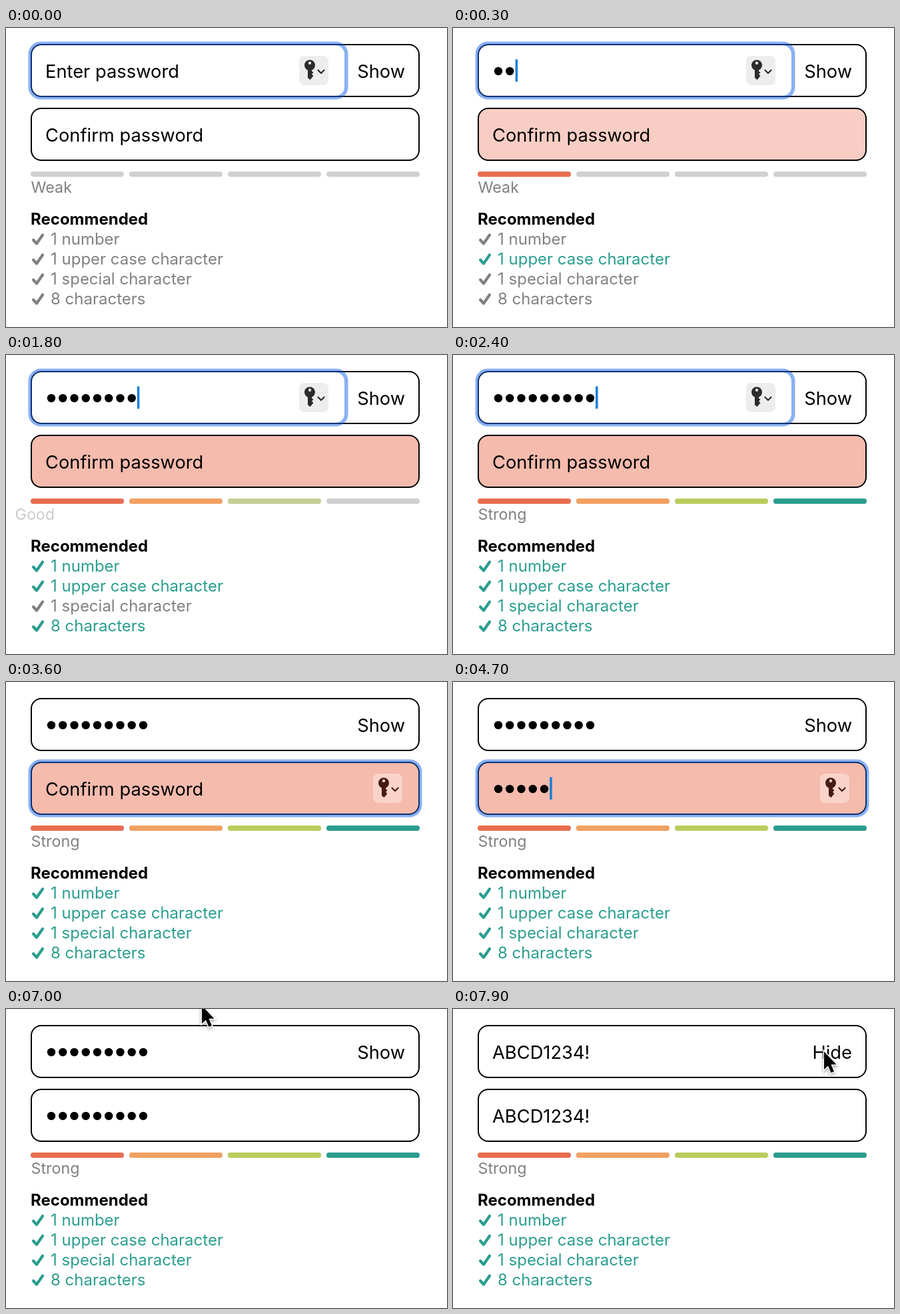
An HTML page with a canvas for the animation above (8 s loop, 662 px wide and 450 px high).

```html
<!DOCTYPE html>
<html lang="en">
<head>
<meta charset="utf-8">
<title>Password form</title>
<style>
html, body { margin: 0; width: 100%; height: 100%; overflow: hidden; background: #fff; }
canvas { display: block; width: 662px; height: 450px; }
</style>
</head>
<body>
<canvas id="stage" width="662" height="450"></canvas>
<script>
const ctx = document.getElementById('stage').getContext('2d');
const LOOP = 8000, STEP = 100;
const SECRET = 'ABCD1234!';
const GRAY = '#808080', TEAL = '#2a9d8f';
const FAMILY = 'Inter, Roboto, sans-serif';
const INPUT_FONT = `27.3px ${FAMILY}`;

// Keystroke times for each field, in ms
const ENTER_KEYS = [100, 300, 500, 800, 1100, 1300, 1500, 1700, 2100];
const CONFIRM_KEYS = [3800, 4200, 4300, 4500, 4700, 4900, 5100, 5400, 6100];
const FOCUS_BUTTON = 2800, FOCUS_CONFIRM = 3200, MATCH = 6100, REVEAL = 7800;

const BARS = [['#e76f51', 100], ['#f1a061', 1100], ['#b8cd5c', 1700], [TEAL, 2100]];
const LABELS = [['Weak', -1000], ['Fair', 1075], ['Good', 1675], ['Strong', 2075]];
const RULES = [['1 number', 1100], ['1 upper case character', 100],
  ['1 special character', 2100], ['8 characters', 1700]];

// [time, opacity] steps of the blinking carets
const ENTER_CARET = [[0, 0], [100, 1], [2500, .5], [2600, 0]];
const CONFIRM_CARET = [[0, 0], [3200, 1], [3400, .65], [3500, .3], [3600, 0],
  [3800, 1], [5800, .5], [5900, 0], [6000, .5], [6100, 0]];

const clamp = v => Math.max(0, Math.min(1, v));
const progress = (t, start, length) => clamp((t - start) / length);
const mix = (a, b, q) => a + (b - a) * q;
const typed = (keys, t) => keys.filter(k => t >= k).length;
const stepValue = (steps, t) => steps.filter(s => t >= s[0]).pop()[1];

function text(str, x, y, font, color = '#000', align = 'left') {
  ctx.font = font;
  ctx.fillStyle = color;
  ctx.textAlign = align;
  ctx.fillText(str, x, y);
}

function box(x, y, w, h, r) {
  ctx.beginPath();
  ctx.roundRect(x, y, w, h, r);
}

function withAlpha(alpha, draw) {
  ctx.save();
  ctx.globalAlpha = alpha;
  draw();
  ctx.restore();
}

function line(points, width, color) {
  ctx.beginPath();
  points.forEach(p => ctx.lineTo(...p));
  ctx.lineWidth = width;
  ctx.lineCap = ctx.lineJoin = 'round';
  ctx.strokeStyle = color;
  ctx.stroke();
}

function frame(y, tint) {
  box(38, y + 1, 582, 78, 15);
  if (tint > 0) withAlpha(tint, () => { ctx.fillStyle = '#f5bbad'; ctx.fill(); });
  ctx.lineWidth = 2;
  ctx.strokeStyle = '#000';
  ctx.stroke();
}

function focusRing(x, y, w, h, r) {
  box(x, y, w, h, r);
  ctx.lineWidth = 5.5;
  ctx.strokeStyle = 'rgba(22,100,232,.5)';
  ctx.stroke();
}

function keyButton(x, y, back, ink) {
  ctx.save();
  ctx.translate(x, y);
  box(0, 0, 44, 44, 8);
  ctx.fillStyle = back;
  ctx.fill();
  ctx.fillStyle = ink;
  ctx.beginPath();
  ctx.arc(16, 14, 8, 0, Math.PI * 2);
  ctx.arc(16, 10.7, 2.2, 0, Math.PI * 2, true);
  ctx.fill();
  ctx.beginPath();
  [[13, 20], [19, 20], [19, 23], [21.5, 25], [19, 27.5], [21.5, 30], [16.5, 36], [13, 33]]
    .forEach(p => ctx.lineTo(...p));
  ctx.fill();
  line([[28.5, 21.5], [33, 26], [37.5, 21.5]], 2.2, ink);
  ctx.restore();
}

function fieldValue(y, count, placeholder, caret, t) {
  if (!count) text(placeholder, 59, y + 51, INPUT_FONT);
  else if (t >= REVEAL) text(SECRET, 59, y + 51, INPUT_FONT);
  else {
    ctx.fillStyle = '#000';
    for (let i = 0; i < count; i++) {
      ctx.beginPath();
      ctx.arc(68 + 17.25 * i, y + 41, 6.2, 0, Math.PI * 2);
      ctx.fill();
    }
  }
  withAlpha(caret, () => {
    box(59.2 + 17.2 * count, y + 23, 3.6, 34, 1.5);
    ctx.fillStyle = '#1a80d9';
    ctx.fill();
  });
}

function enterField(t) {
  frame(24, 0);
  if (t < FOCUS_BUTTON) {
    focusRing(36.25, 23.25, 474.5, 81.5, 16);
    keyButton(440, 42, '#ededed', '#2b2b2b');
  } else if (t < FOCUS_CONFIRM) {
    focusRing(503, 19.5, 123, 90, 18);
  }
  fieldValue(24, typed(ENTER_KEYS, t), 'Enter password', stepValue(ENTER_CARET, t), t);
  text(t < REVEAL ? 'Show' : 'Hide', 599, 75, INPUT_FONT, '#000', 'right');
}

function confirmField(t) {
  frame(120, t < MATCH ? progress(t, 50, 350) : 0);
  if (t >= FOCUS_CONFIRM && t < MATCH) {
    focusRing(36.25, 119.25, 585.5, 81.5, 16);
    keyButton(551, 138, 'rgba(255,255,255,.35)', '#481b13');
  }
  fieldValue(120, typed(CONFIRM_KEYS, t), 'Confirm password', stepValue(CONFIRM_CARET, t), t);
}

function strengthBars(t) {
  BARS.forEach(([color, start], i) => {
    box(37 + 148 * i, 216, 140, 8, 4);
    ctx.fillStyle = '#d0d0d0';
    ctx.fill();
    withAlpha(progress(t, start, 200), () => { ctx.fillStyle = color; ctx.fill(); });
  });
}

// The old word slips away to the right, the new one comes in from the left
function strengthLabel(t) {
  const index = LABELS.filter(l => t >= l[1]).length - 1;
  const age = t - LABELS[index][1];
  const leaving = age < 85;
  const q = leaving ? (age / 85) ** 2 : progress(age, 85, 100);
  const word = LABELS[leaving ? index - 1 : index][0];
  const x = leaving ? 55 * q : -40 * (1 - q);
  withAlpha(leaving ? 1 - q : q, () =>
    text(word, 37.5 + x, 248, `23.3px ${FAMILY}`, GRAY));
}

function rules(t) {
  text('Recommended', 37, 296, `bold 24px ${FAMILY}`);
  RULES.forEach(([rule, met], i) => {
    const color = t >= met ? TEAL : GRAY, y = 326 + 30 * i;
    line([[41, y - 7], [46, y - 1.5], [55, y - 14.5]], 4.2, color);
    text(rule, 67, y, `24px ${FAMILY}`, color);
  });
}

function pointer(t) {
  if (t < 6800) return;
  const a = progress(t, 6800, 200);
  const b = 1 - (1 - progress(t, 7000, 400)) ** 1.6;
  const x = mix(151, 294, a) + 263 * b;
  const y = mix(-22, -5, a) + 69 * b;
  ctx.save();
  ctx.translate(x, y);
  ctx.beginPath();
  [[0, 0], [0, 27], [6, 21.5], [10.5, 32], [15, 30], [10.5, 19.5], [18.5, 19.5]]
    .forEach(p => ctx.lineTo(...p));
  ctx.closePath();
  ctx.lineJoin = 'miter';
  ctx.lineWidth = 3;
  ctx.strokeStyle = '#fff';
  ctx.shadowColor = 'rgba(0,0,0,.4)';
  ctx.shadowBlur = 4;
  ctx.shadowOffsetY = 2;
  ctx.stroke();
  ctx.shadowColor = 'transparent';
  ctx.fillStyle = '#000';
  ctx.fill();
  ctx.restore();
}

function draw(now) {
  const t = Math.floor((now % LOOP) / STEP) * STEP;
  ctx.fillStyle = '#fff';
  ctx.fillRect(0, 0, 662, 450);
  enterField(t);
  confirmField(t);
  strengthBars(t);
  strengthLabel(t);
  rules(t);
  pointer(t);
}

let origin;
function tick(now) {
  origin ??= now;
  draw(Math.max(0, now - origin));
  requestAnimationFrame(tick);
}
draw(0);
requestAnimationFrame(tick);
</script>
</body>
</html>
```
